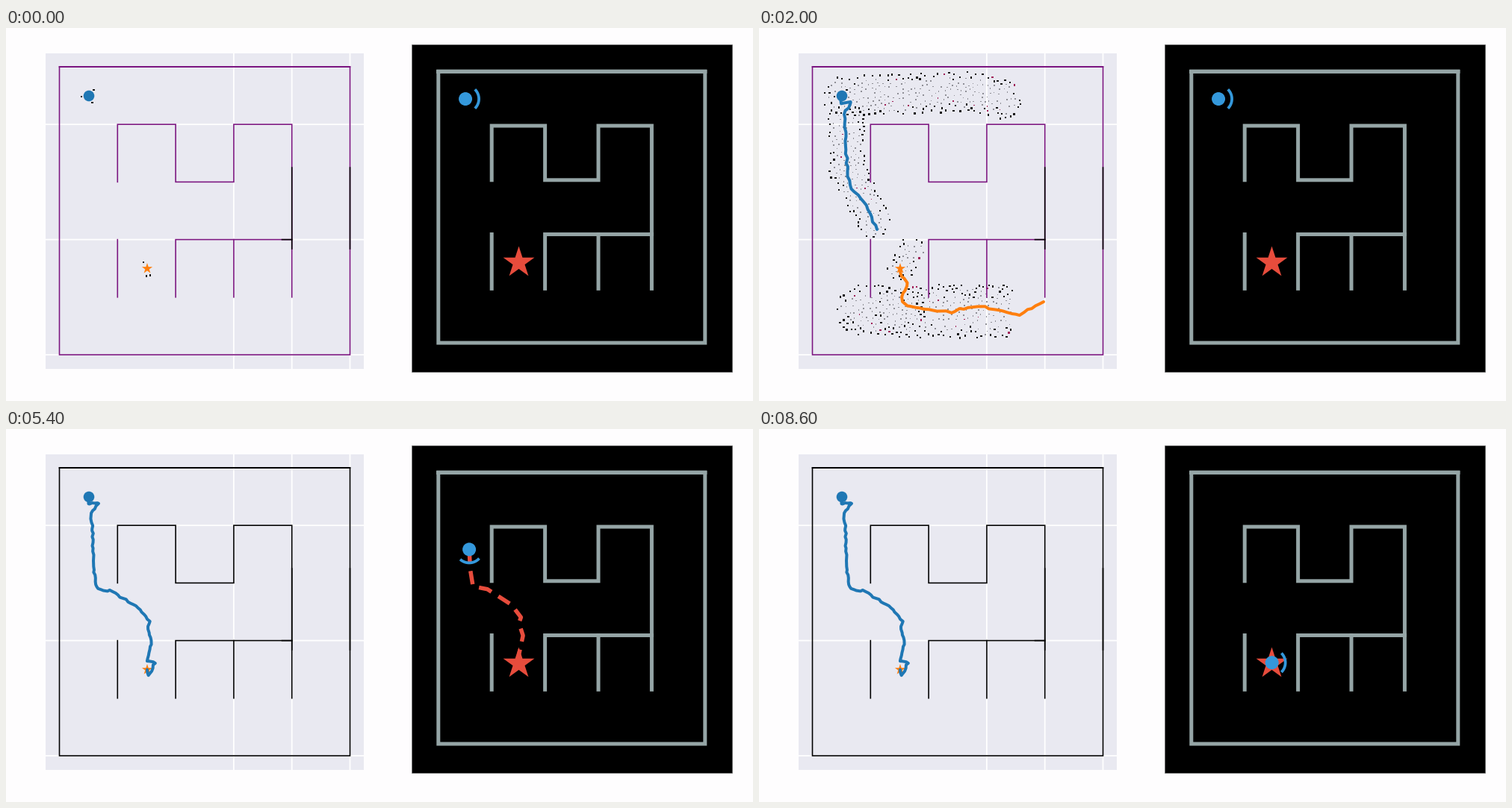
Animation of 1000 by 500 pixels, one loop 8800 ms. Source, as a matplotlib script:

```python
import numpy as np
import matplotlib.pyplot as plt
from matplotlib.animation import FuncAnimation
from matplotlib.patches import Circle, Polygon, Rectangle

STEP, FRAMES = 200, 44
PLAN_END, GO, ARRIVE = 3400, 4000, 8500
PX = 0.72  # points per pixel at 100 dpi
BLUE, ORANGE, PURPLE = "#1f77b4", "#ff7f0e", "#7b1580"
SKY, RED, WALL = "#3498db", "#e74c3c", "#95a5a6"
START, GOAL = (111, 91), (189, 322.5)

# Maze corner and cell size in both views
PLAN_ORIGIN, PLAN_CELL = np.array([71.5, 52.0]), np.array([77.8, 77.2])
SIM_ORIGIN, SIM_CELL = np.array([578.8, 58.3]), np.array([71.4, 72.75])
WALLS = [
    [(0, 0), (5, 0), (5, 5), (0, 5), (0, 0), (5, 0)],
    [(1, 2), (1, 1), (2, 1), (2, 2), (3, 2), (3, 1), (4, 1), (4, 4)],
    [(1, 3), (1, 4)],
    [(4, 3), (2, 3), (2, 4)],
    [(3, 3), (3, 4)],
]

rng = np.random.default_rng(7)
fig = plt.figure(figsize=(10, 5), dpi=100, facecolor="#fefdfe")
ax = fig.add_axes([0, 0, 1, 1])
ax.set(xlim=(0, 1000), ylim=(500, 0))
ax.axis("off")


def line(pts, color, width, z, cap="projecting", join="miter", **kw):
    x, y = np.array(pts, float).reshape(-1, 2).T
    return ax.plot(x, y, color=color, lw=width * PX, zorder=z, snap=False,
                   solid_capstyle=cap, solid_joinstyle=join, **kw)[0]


def box(x0, y0, x1, y1, **kw):
    ax.add_patch(Rectangle((x0, y0), x1 - x0, y1 - y0, **kw))


def star(x, y, r, color, z):
    a = np.arange(10) * np.pi / 5 - np.pi / 2
    rad = np.where(np.arange(10) % 2, 0.382 * r, r)
    pts = np.c_[x + rad * np.cos(a), y + rad * np.sin(a)]
    ax.add_patch(Polygon(pts, fc=color, lw=0, zorder=z))


def maze(walls, origin, cell, color, width, z):
    return [line(origin + np.array(w) * cell, color, width, z) for w in walls]


def resample(keys, gap):
    """Evenly spaced points along a polyline."""
    keys = np.array(keys, float)
    run = np.r_[0, np.cumsum(np.hypot(*np.diff(keys, axis=0).T))]
    s = np.linspace(0, run[-1], int(run[-1] / gap) + 2)
    return np.c_[np.interp(s, run, keys[:, 0]), np.interp(s, run, keys[:, 1])]


def wander(keys, gap=6, jitter=0.8):
    pts = resample(keys, gap)
    pts[1:-1] += rng.normal(0, jitter, (len(pts) - 2, 2))
    return pts


# Planner view
box(53, 34, 479, 457, fc="#e9e9f1", lw=0, zorder=0)
for k in (3, 4, 5):
    x = PLAN_ORIGIN[0] + k * PLAN_CELL[0]
    line([(x, 34), (x, 457)], "white", 1.8, 1, cap="butt")
for k in (1, 3, 5):
    y = PLAN_ORIGIN[1] + k * PLAN_CELL[1]
    line([(53, y), (479, y)], "white", 1.8, 1, cap="butt")
plan_walls = maze(WALLS, PLAN_ORIGIN, PLAN_CELL, PURPLE, 1.6, 4)
maze([[(x, 1.75), (x, 3.16)] for x in (4, 5)] + [[(3.83, 3), (4, 3)]],
     PLAN_ORIGIN, PLAN_CELL, "black", 1.6, 5)
ax.add_patch(Circle(START, 7.3, fc=BLUE, lw=0, zorder=8))
star(*GOAL, 7.5, ORANGE, 6)

# Robot view
box(543, 22, 972, 461, fc="black", ec="#707070", lw=0.6 * PX, zorder=0)
maze(WALLS, SIM_ORIGIN, SIM_CELL, WALL, 5, 4)
star(686.5, 314.5, 22, RED, 7)

# Tree branches by their turning points, and the step at which each is grown
east = [START, (110, 101), (124, 107), (148, 88), (181, 75), (207, 84),
        (225, 80), (247, 94)]
south = [START, (110, 101), (125, 98), (114, 113), (118, 190)]
stem = [GOAL, (187, 330), (200, 342), (191, 361), (198, 373)]
branches = {
    "E": (wander(east + [(265, 98), (284, 92)]), 6),
    "D": (wander(east + [(248, 110)]), 16),
    "S": (wander(south + [(124, 216), (142, 235), (158, 270)]), 10),
    "W": (wander(stem[:3] + [(184, 372), (143, 367), (124, 376)]), 6),
    "X": (wander(stem + [(255, 381), (297, 372), (347, 385), (381, 367)]), 10),
    "Y": (wander(stem + [(215, 388), (222, 404)]), 16),
}
BLUE_TURNS, ORANGE_TURNS = "SEDSESE", "XWYXWXW"
blue_line = line([], BLUE, 4, 7, cap="round", join="round")
orange_line = line([], ORANGE, 4, 7, cap="round", join="round")


def grown(turns, i):
    pts, full = branches[turns[i % len(turns)]]
    return pts[:1 + int(min(1, i / full) * (len(pts) - 1))]


def sweep(spine, half, t0, t1):
    """Spread nodes around a spine: x, y, birth time, closeness to the rim."""
    spine = resample(spine, 3)
    lo, hi = spine.min(0) - half, spine.max(0) + half
    p = rng.uniform(lo, hi, (int(np.prod(hi - lo) / 18), 2))
    dist = np.hypot(*(p[:, None] - spine).transpose(2, 0, 1))
    near, rim = dist.argmin(1), dist.min(1) / half
    birth = t0 + (t1 - t0) * (near + 1) / len(spine)
    return np.c_[p, birth, rim][rim < 1]


def thin(nodes, gap):
    kept = []
    for n in nodes:
        if not kept or np.hypot(*(np.array(kept)[:, :2] - n[:2]).T).min() > gap:
            kept.append(n)
    return np.array(kept)


a = rng.uniform(0, 2 * np.pi, 6)
roots = np.repeat([START, GOAL], 3, axis=0) + 10 * np.c_[np.cos(a), np.sin(a)]
nodes = thin(np.vstack([
    np.c_[roots, np.zeros(6), np.ones(6)],
    sweep([START, (285, 85), (325, 95)], 27, 0, 1600),
    sweep([(117, 118), (118, 190), (155, 258)], 24, 300, 2000),
    sweep([(155, 245), (192, 235)], 48, 2000, 3100),
    sweep([GOAL, (207, 295)], 18, 0, 1000),
    sweep([(190, 380), (138, 378)], 34, 0, 1300),
    sweep([(190, 380), (415, 380)], 36, 200, 2900),
]), 4.6)
birth = nodes[:, 2]
dark = nodes[:, 3] + rng.uniform(-0.25, 0.25, len(nodes)) > 0.68
size = np.where(dark, 2.3, 1.6) * PX
tint = np.where(dark, "#151515", "#8f8f96").astype(object)
tint[rng.random(len(nodes)) < 0.05] = "#a02058"
dots = ax.scatter(nodes[:, 0], nodes[:, 1], s=size ** 2, c=list(tint),
                  marker="s", linewidths=0, zorder=3)

# Found route, and the robot's track along it
approach = south + [(122, 214), (143, 218), (178, 240), (192, 258),
                    (189, 266), (195, 284), (189, 311)]
route = wander(approach + [(200, 313), (191, 331), GOAL], 4, 0.6)
track = np.array(approach + [GOAL])
track = SIM_ORIGIN + (track - PLAN_ORIGIN) / PLAN_CELL * SIM_CELL
seg = np.diff(track, axis=0)
run = np.r_[0, np.cumsum(np.hypot(*seg.T))]

dashes = line([], RED, 5.5, 6, dashes=(18 / 5.5, 11 / 5.5),
              dash_capstyle="butt")
robot = ax.add_patch(Circle(track[0], 9, fc=SKY, lw=0, zorder=9))
arc = line([], SKY, 3.8, 9, cap="butt")


def pose(t):
    """Position, heading and route still ahead."""
    s = np.interp(t, (GO, ARRIVE), (0, run[-1]))
    pos = np.array([np.interp(s, run, track[:, k]) for k in (0, 1)])
    ahead = np.vstack([pos, track[run > s]])
    if s <= 0 or s >= run[-1]:
        return pos, 0, ahead
    dx, dy = seg[np.searchsorted(run, s) - 1]
    return pos, np.arctan2(dy, dx), ahead


def draw(i):
    t = i * STEP
    planning = t < PLAN_END
    pos, heading, ahead = pose(t)
    nothing = np.empty((0, 2))
    for w in plan_walls:
        w.set_color(PURPLE if planning else "black")
    blue_line.set_data(*(grown(BLUE_TURNS, i) if planning else route).T)
    orange_line.set_data(*(grown(ORANGE_TURNS, i) if planning else nothing).T)
    dots.set_sizes(np.where(planning & (birth <= t), size, 0) ** 2)
    dashes.set_data(*(nothing if planning else ahead).T)
    robot.center = pos
    a = heading + np.linspace(-np.pi / 4, np.pi / 4, 24)
    arc.set_data(pos[0] + 18 * np.cos(a), pos[1] + 18 * np.sin(a))
    return []


anim = FuncAnimation(fig, draw, frames=FRAMES, interval=STEP,
                     init_func=lambda: draw(0), repeat=True, repeat_delay=0)
plt.show()
```
